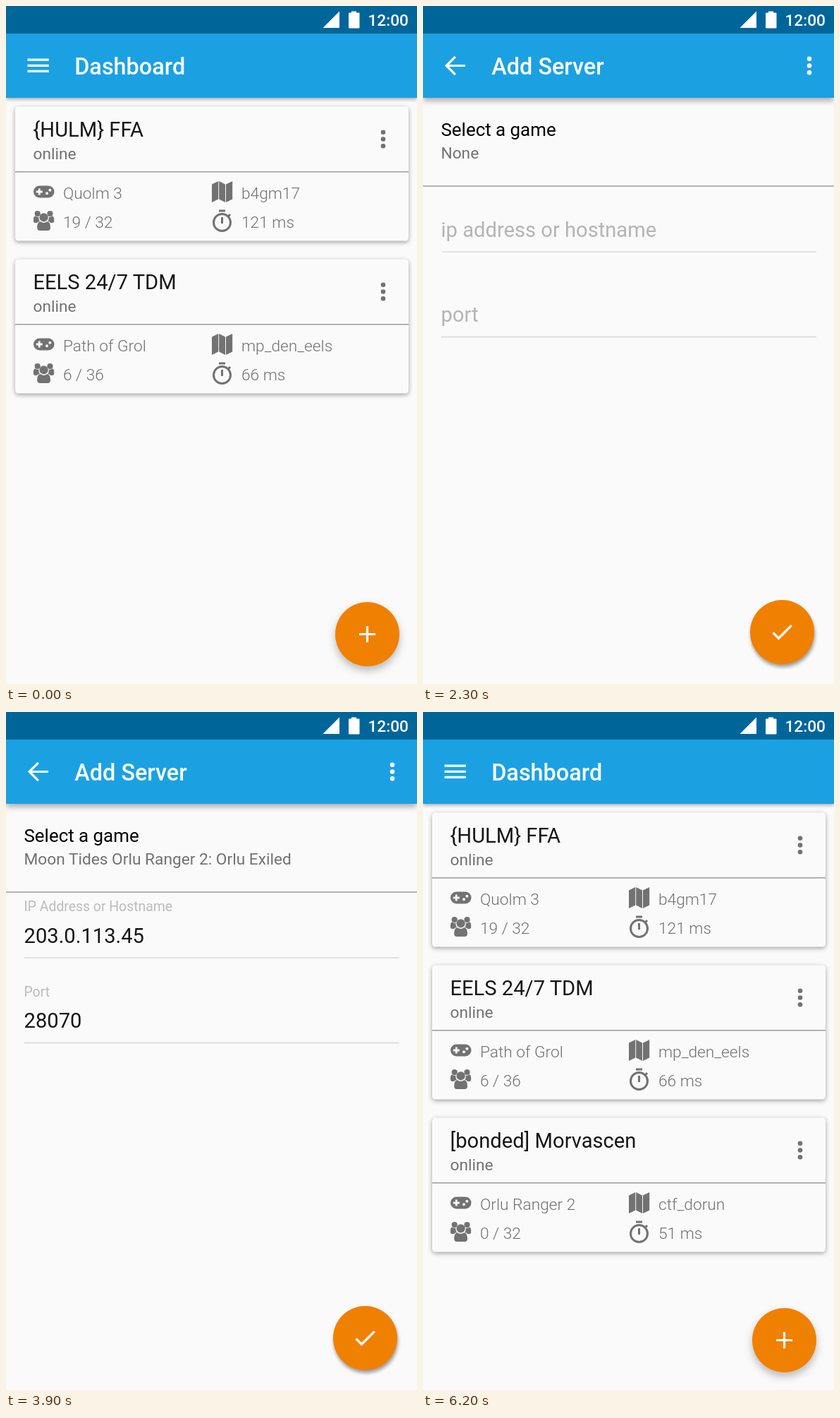
These frames come from a looping animation (583 px wide and 960 px high, 8000 ms). An HTML page:

```html
<!DOCTYPE html>
<html lang="en">
<head>
<meta charset="utf-8">
<title>Server dashboard</title>
<style>
html, body { margin: 0; width: 100%; height: 100%; overflow: hidden; background: #000; }
svg { display: block; width: 100vw; height: 100vh; font-family: Roboto, "Open Sans", sans-serif; }

.bg { fill: #fafafa; }
.bar { fill: #1ba1e2; }
.accent { fill: #f08000; }
.white { fill: #fff; }
.line { fill: none; stroke: #fff; stroke-width: 3.2; }
.rule { stroke: #9c9c9c; stroke-width: 1.6; }
.under { stroke: #dfdfdf; stroke-width: 1.8; }
.icon { fill: #727272; }

.title { font-size: 32.4px; font-weight: 500; fill: #fff; }
.clock { font-size: 22.7px; font-weight: 500; fill: #fff; text-anchor: end; }
.big { font-size: 29.15px; fill: #161616; }
.mid { font-size: 25.9px; fill: #000; }
.sub { font-size: 22.7px; fill: #727272; }
.info { font-size: 22.7px; font-weight: 300; fill: #707070; }
.hint { font-size: 29.15px; fill: #b4b4b4; }
.label { font-size: 19.4px; fill: #bcbcbc; }

.card > rect { filter: drop-shadow(0 2.5px 3px rgba(0,0,0,.36)); }
.flat { filter: drop-shadow(0 2px 2.5px rgba(0,0,0,.34)); }
.high { filter: drop-shadow(0 4px 4px rgba(0,0,0,.33)); }
.soft { filter: drop-shadow(0 6px 6px rgba(0,0,0,.26)); }
.tight { filter: drop-shadow(1px 4px 2.5px rgba(0,0,0,.38)); }
.sheet { fill: #efefef; filter: drop-shadow(0 5px 9px rgba(0,0,0,.42)); }

/* every part moves in 100 ms steps (1.25%) of the shared 8 s loop */
.dash, .new, .form, .empty, .filled, .float, .menu, .touch, .tapAdd, .tapDone {
  animation: 8s step-end infinite;
}
.dash { animation-name: dash; }
.new { animation-name: new; }
.form { animation-name: form; }
.empty { animation-name: empty; }
.filled { animation-name: filled; }
.float { animation-name: float; }
.menu { animation-name: menu; transform-origin: 577px 45px; }
.touch { animation-name: touch; }
.tapAdd { animation-name: tapAdd; }
.tapDone { animation-name: tapDone; }

@keyframes dash {
  0% { opacity: 1; }
  7.5% { opacity: .95; }
  8.75% { opacity: .8; }
  75% { opacity: .82; }
  76.25% { opacity: .93; }
  77.5%, 100% { opacity: 1; }
}
@keyframes new {
  0% { visibility: hidden; }
  75%, 100% { visibility: visible; }
}
@keyframes form {
  0% { opacity: 0; transform: translateY(35px); }
  7.5% { opacity: .68; transform: translateY(35px); }
  8.75% { opacity: .98; transform: translateY(5px); }
  10% { opacity: 1; transform: none; }
  75% { opacity: .88; transform: translateY(3px); }
  76.25% { opacity: .38; transform: translateY(22px); }
  77.5%, 100% { opacity: 0; transform: translateY(77px); }
}
@keyframes empty {
  0% { visibility: visible; }
  43.75%, 100% { visibility: hidden; }
}
@keyframes filled {
  0% { visibility: hidden; }
  43.75%, 100% { visibility: visible; }
}
@keyframes float {
  0% { opacity: 0; transform: translateY(10px); }
  45% { opacity: .25; transform: translateY(8px); }
  46.25% { opacity: .6; transform: translateY(4px); }
  47.5% { opacity: .88; transform: translateY(1px); }
  48.75%, 100% { opacity: 1; transform: none; }
}
@keyframes menu {
  0% { opacity: 0; transform: scale(.5); }
  30% { opacity: .35; transform: scale(.55, .45); }
  31.25% { opacity: .75; transform: scale(.86, .82); }
  32.5% { opacity: .95; transform: scale(.97); }
  33.75% { opacity: 1; transform: none; }
  45% { opacity: .7; transform: none; }
  46.25% { opacity: .35; transform: none; }
  47.5% { opacity: .1; transform: none; }
  48.75%, 100% { opacity: 0; transform: none; }
}
@keyframes touch {
  0% { opacity: 0; r: 32px; }
  43.75% { opacity: 1; r: 32px; }
  45% { opacity: .8; r: 80px; }
  46.25% { opacity: .5; r: 150px; }
  47.5%, 100% { opacity: 0; r: 200px; }
}
@keyframes tapAdd {
  0% { opacity: 0; }
  6.25% { opacity: .12; }
  7.5% { opacity: .07; }
  8.75%, 100% { opacity: 0; }
}
@keyframes tapDone {
  0% { opacity: 0; }
  67.5% { opacity: .13; }
  68.75% { opacity: .06; }
  70%, 100% { opacity: 0; }
}
</style>
</head>
<body>
<svg viewBox="0 0 583 960" preserveAspectRatio="none">
  <defs>
    <g id="dots">
      <circle cy="-9.7" r="3.3"/><circle r="3.3"/><circle cy="9.7" r="3.3"/>
    </g>
    <g id="pad">
      <rect x="39" y="254.5" width="29.5" height="17" rx="8.5"/>
      <path d="M42.8 263h9M47.3 258.5v9" stroke="#fafafa" stroke-width="2.8"/>
      <circle cx="58" cy="265.3" r="2" fill="#fafafa"/>
      <circle cx="62.4" cy="260.8" r="2" fill="#fafafa"/>
    </g>
    <g id="people">
      <circle cx="44.7" cy="294" r="4.1"/>
      <circle cx="62.5" cy="294" r="4.1"/>
      <path d="M39 305v-3c0-3 1-4.5 2.5-4.5 2 1.5 4.5 1.5 5 1-.4 3 .3 5 1.5 6.5-2 0-3 .8-4 2h-2.5q-2.5 0-2.5-2z"/>
      <path d="M68.2 305v-3c0-3-1-4.5-2.5-4.5-2 1.5-4.5 1.5-5 1 .4 3-.3 5-1.5 6.5 2 0 3 .8 4 2h2.5q2.5 0 2.5-2z"/>
      <circle cx="53.6" cy="299.3" r="6.1"/>
      <path d="M49 305.3q4.6 3.4 9.2 0c3.8 0 4.8 4.7 4.8 8.7q0 4-4 4h-10.8q-4 0-4-4c0-4 1-8.7 4.8-8.7z"/>
    </g>
    <path id="map" d="M292 252.5l9.2-4.5v25.5l-9.2 4.5zM302.2 248l8.8 4.5v25.5l-8.800-4.500zM312 252.5l9.2-4.5v25.5l-9.2 4.5z"/>
    <g id="timer" transform="translate(306.5 306.5) scale(1.5)" fill="none" stroke="#727272" stroke-width="2">
      <circle r="8"/>
      <path d="M-3-11h6M0-5v6M5.200-5.200l2.500-2.500"/>
    </g>
  </defs>

  <g class="dash">
    <rect class="bg" width="583" height="960"/>
    <rect class="bar flat" y="39" width="583" height="91"/>
    <rect width="583" height="39" fill="#006699"/>
    <path class="line" d="M30.500 76.200h30.300M30.500 84.300h30.300M30.500 92.400h30.300"/>
    <text class="title" x="97.2" y="97">Dashboard</text>
    <g id="cards"></g>
    <circle class="accent soft" cx="512.5" cy="889.5" r="45.5"/>
    <circle class="white tapAdd" cx="512.5" cy="889.5" r="45.5"/>
    <path class="line" d="M501 889.5h23M512.5 878v23"/>
  </g>

  <g class="form">
    <rect class="bg" width="583" height="960"/>
    <rect class="bar high" y="39" width="583" height="91"/>
    <rect width="583" height="39" fill="#006699"/>
    <path class="line" d="M45.800 71.800l-12.700 12.700 12.700 12.700M33 84.500h27"/>
    <text class="title" x="97.2" y="97">Add Server</text>
    <use class="white" href="#dots" x="548" y="84.5"/>

    <text class="mid" x="25.5" y="183.5">Select a game</text>
    <path class="rule" d="M0 255h583"/>
    <path class="under" d="M26 348.2h532M26 468.5h532"/>
    <g class="empty">
      <text class="sub" x="25.5" y="216">None</text>
      <text class="hint" x="25.5" y="326.5">ip address or hostname</text>
      <text class="hint" x="25.5" y="447">port</text>
    </g>
    <g class="filled">
      <text class="sub" x="25.5" y="216">Moon Tides Orlu Ranger 2: Orlu Exiled</text>
      <text class="big" x="25.5" y="326.5">203.0.113.45</text>
      <text class="big" x="25.5" y="447">28070</text>
    </g>
    <g class="float">
      <text class="label" x="25.5" y="282">IP Address or Hostname</text>
      <text class="label" x="25.5" y="402.5">Port</text>
    </g>

    <circle class="accent tight" cx="509.5" cy="886.5" r="45.5"/>
    <circle class="white tapDone" cx="509.5" cy="886.5" r="45.5"/>
    <path class="white" transform="translate(489.8 866.8) scale(1.62)" d="M9 16.170L4.830 12l-1.420 1.410L9 19 21 7l-1.410-1.410z"/>

    <g class="menu">
      <clipPath id="sheet"><rect x="260" y="45" width="317.5" height="79" rx="3"/></clipPath>
      <rect class="sheet" x="260" y="45" width="317.5" height="79" rx="3"/>
      <g clip-path="url(#sheet)"><circle class="touch" cx="476.5" cy="90" r="32" fill="#e2e2e2"/></g>
      <text class="mid" x="285" y="94.3" style="fill:#1c1c1c">Example</text>
    </g>
  </g>

  <path class="white" d="M449.5 31h23.5v-23.5zM486 10.5q0-1 1-1h3v-2h7v2h3.500q1 0 1 1v20q0 1-1 1h-13.500q-1 0-1-1z"/>
  <text class="clock" x="571" y="28">12:00</text>
</svg>
<script>
const servers = [
  ["{HULM} FFA", "Quolm 3", "b4gm17", "19 / 32", "121 ms"],
  ["EELS 24/7 TDM", "Path of Grol", "mp_den_eels", "6 / 36", "66 ms"],
  ["[bonded] Morvascen", "Orlu Ranger 2", "ctf_dorun", "0 / 32", "51 ms"]
];

const text = (style, x, y, words) => `<text class="${style}" x="${x}" y="${y}">${words}</text>`;

const card = ([name, game, map, players, ping], i) => `
  <g class="card${i === 2 ? " new" : ""}" transform="translate(0 ${i * 216})">
    <rect class="bg" x="13" y="142.5" width="558" height="190" rx="4.5"/>
    <path class="rule" d="M13 234.7h558"/>
    ${text("big", 38.5, 184.5, name)}
    ${text("sub", 38.5, 217, "online")}
    <g class="icon">
      <use href="#dots" x="535" y="188.5"/>
      <use href="#pad"/><use href="#people"/><use href="#map"/><use href="#timer"/>
    </g>
    ${text("info", 81, 273, game)}
    ${text("info", 334, 273, map)}
    ${text("info", 81, 313.7, players)}
    ${text("info", 334, 313.7, ping)}
  </g>`;

document.getElementById("cards").innerHTML = servers.map(card).join("");
</script>
</body>
</html>
```
